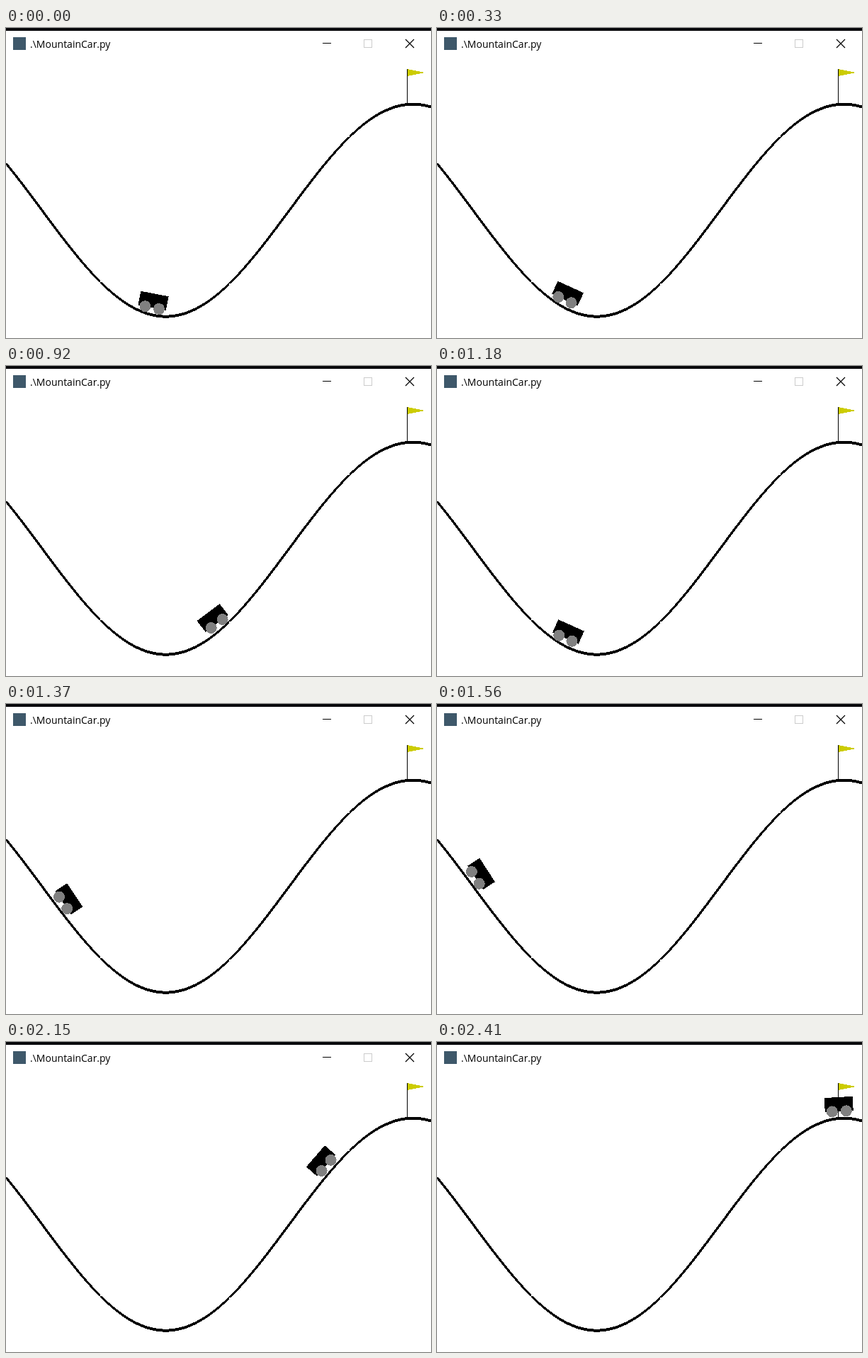
Recreate the animation shown at these times as an HTML page. Size 600 by 438 pixels, loop 2.48 s.

```html
<!DOCTYPE html>
<html lang="en">
<head>
<meta charset="utf-8">
<title>Mountain car</title>
<style>
  html, body { margin: 0; width: 100%; height: 100%; overflow: hidden; background: #fff; }
  svg { display: block; width: 600px; height: 438px; shape-rendering: crispEdges; }
  text { font: 14px "Open Sans", "Noto Sans", sans-serif; }
</style>
</head>
<body>
<svg viewBox="0 0 600 438">
  <rect width="600" height="438" fill="#fff"/>
  <rect width="600" height="4" fill="#08090c"/>
  <rect x="10" y="13" width="18" height="18" fill="#3e586a"/>
  <text x="34" y="28">.\MountainCar.py</text>
  <g id="buttons" fill="none" stroke="#000">
    <path d="M447 21.5H459"/>
    <rect x="505.5" y="16.5" width="11" height="11" stroke="#ccc"/>
    <path d="M564 16L576 28M576 16L564 28" stroke-width="1.2" shape-rendering="auto"/>
  </g>
  <path id="track"/>
  <g id="car">
    <rect x="-20" y="-30" width="40" height="20"/>
    <circle cx="10" cy="-10" r="8" fill="#808080"/>
    <circle cx="-10" cy="-10" r="8" fill="#808080"/>
  </g>
  <path d="M566.5 58V108" stroke="#000"/>
  <path d="M567 58V68L591 63Z" fill="#cc0"/>
</svg>
<script>
const LOOP = 2480, TICKS = 38, SCALE = 600 / 1.8, BASE = 441;
const byId = id => document.getElementById(id);
const car = byId('car'), buttons = byId('buttons');

// The hill is a sine over positions -1.2 to 0.6
const toX = p => (p + 1.2) * SCALE;
const toY = p => BASE - (Math.sin(3 * p) * 0.45 + 0.55) * SCALE;

// Turning points and the fast passages between them
const swings = [
  { tick: 0, pos: -0.587, speed: -0.056 },
  { tick: 3.5, pos: -0.704, speed: 0 },
  { tick: 12.6, pos: -0.251, speed: 0 },
  { tick: 18, pos: -0.668, speed: -0.118 },
  { tick: 23.1, pos: -1.072, speed: 0 },
  { tick: 28, pos: -0.677, speed: 0.19 },
  { tick: 33, pos: 0.179, speed: 0.111 },
  { tick: 37, pos: 0.505, speed: 0.055 }
];

// Cubic Hermite from one swing point to the next
function position(tick) {
  const i = Math.max(1, swings.findIndex(s => s.tick >= tick));
  const a = swings[i - 1], b = swings[i];
  const d = b.tick - a.tick, s = (tick - a.tick) / d, r = 1 - s;
  return a.pos + (b.pos - a.pos) * s * s * (3 - 2 * s) + d * s * r * (a.speed * r - b.speed * s);
}

// Nine evenly spread ticks are shorter than the rest
function tickLength(n) {
  const r = 9 * n % TICKS;
  return r >= 11 && r < 20 ? 50 : 70;
}

function tickAt(ms) {
  let n = 0;
  for (let end = tickLength(0); ms >= end && n < TICKS - 1; end += tickLength(n)) n++;
  return n;
}

// Each piece is thickened along its minor axis
function trackPath() {
  const point = i => { const p = -1.2 + 1.8 * i / 99; return [toX(p), toY(p)]; };
  let d = '';
  for (let i = 0; i < 99; i++) {
    const [x0, y0] = point(i), [x1, y1] = point(i + 1);
    const steep = Math.abs(y1 - y0) > x1 - x0;
    const a = steep ? 2 : 0, b = steep ? 0 : 2;
    d += `M${x0 - a} ${y0 - b}L${x1 - a} ${y1 - b}L${x1 + a} ${y1 + b}L${x0 + a} ${y0 + b}Z`;
  }
  return d;
}

function draw(ms) {
  const tick = tickAt(ms % LOOP), p = position(tick);
  const angle = -Math.cos(3 * p) * 180 / Math.PI;
  car.setAttribute('transform', `translate(${toX(p)} ${toY(p)}) rotate(${angle})`);
  buttons.setAttribute('visibility', tick === TICKS - 1 ? 'hidden' : 'visible');
}

function loop() {
  draw(performance.now());
  requestAnimationFrame(loop);
}

byId('track').setAttribute('d', trackPath());
loop();
</script>
</body>
</html>
```
